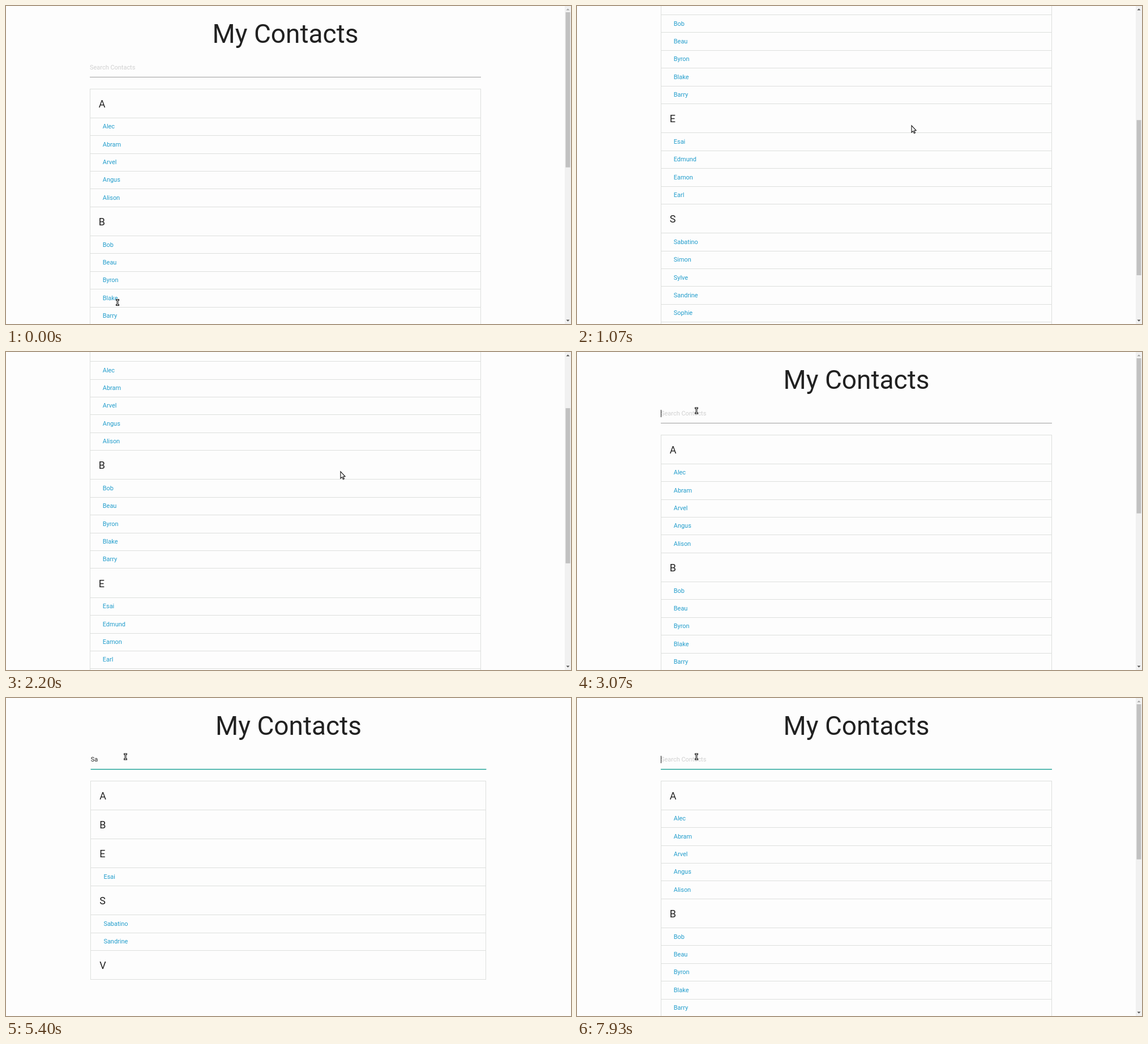
Animation of 998 by 561 pixels, one loop 8 s. Source, as an HTML page with a canvas:

```html
<!DOCTYPE html>
<html lang="en">
<head>
<meta charset="utf-8">
<title>My Contacts</title>
<style>
html, body { margin: 0; width: 100%; height: 100%; overflow: hidden; background: #fdfdfd; }
canvas { display: block; }
</style>
</head>
<body>
<canvas id="stage" width="998" height="561"></canvas>
<script>
const W = 998, H = 561, LOOP = 8000, TICK = 1000 / 15;
const BAR = 11, LIST_TOP = 146, HEAD_H = 51.3, ROW_H = 31.4, BOTTOM_GAP = 10.5;
const FONT = 'Roboto, Arial, sans-serif';
const ctx = document.getElementById('stage').getContext('2d');

const contacts = {
  A: ['Alec', 'Abram', 'Arvel', 'Angus', 'Alison'],
  B: ['Bob', 'Beau', 'Byron', 'Blake', 'Barry'],
  E: ['Esai', 'Edmund', 'Eamon', 'Earl'],
  S: ['Sabatino', 'Simon', 'Sylve', 'Sandrine', 'Sophie'],
  V: ['Valerie', 'Venso', 'Violetta']
};

// Keys are [tick, value...], 15 ticks per second.
const scrollKeys = [[0, 0], [6, 0], [11, 271.2], [12, 271.2], [16, 390], [18, 390], [21, 460],
  [24, 460], [27, 542.5], [35, 60], [39, 60], [41, 0]];
const pointerKeys = [[0, 197, 523, 'beam'], [2, 262, 470, 'arrow'], [5, 450, 330, 'arrow'],
  [7, 591, 211, 'arrow'], [43, 420, 160, 'arrow'], [44, 211, 103.5, 'beam']];
const queryKeys = [[0, ''], [54, 'S'], [60, 'Sa'], [84, 'S'], [86, ''], [95, 'V'],
  [97, 'Ve'], [101, 'Ven'], [113, 'V'], [115, '']];
const caretKeys = [[0, false], [46, true], [64, false], [72, true], [81, false], [84, true],
  [110, false], [113, true]];

const held = (keys, tick) => keys.filter(k => k[0] <= tick).pop();

function tween(keys, tick) {
  const i = keys.findIndex(k => k[0] > tick);
  if (i < 0) return keys[keys.length - 1][1];
  const [t0, a] = keys[i - 1], [t1, b] = keys[i];
  return a + (b - a) * (tick - t0) / (t1 - t0);
}

function rect(x, y, w, h, color) {
  ctx.fillStyle = color;
  ctx.fillRect(x, y, w, h);
}

function text(str, x, y, size, color, align = 'left') {
  ctx.font = size + 'px ' + FONT;
  ctx.textAlign = align;
  ctx.fillStyle = color;
  ctx.fillText(str, x, y);
}

function polygon(points, fill, stroke) {
  ctx.beginPath();
  points.forEach(([x, y]) => ctx.lineTo(x, y));
  ctx.closePath();
  ctx.fillStyle = fill;
  ctx.fill();
  if (stroke) {
    ctx.strokeStyle = stroke;
    ctx.lineWidth = 1.1;
    ctx.stroke();
  }
}

function layout(query) {
  const rows = [];
  let y = LIST_TOP;
  const add = (label, head) => {
    rows.push({ label, head, y });
    y += head ? HEAD_H : ROW_H;
  };
  for (const letter in contacts) {
    add(letter, true);
    contacts[letter]
      .filter(name => name.toLowerCase().includes(query.toLowerCase()))
      .forEach(name => add(name, false));
  }
  return { rows, end: y, height: y + BOTTOM_GAP };
}

function drawField(left, width, query, caret, focus) {
  if (query) text(query, left, 111.7, 10.96, '#222');
  else text('Search Contacts', left, 111.7, 10.96, '#d0d0d0');
  if (caret) {
    ctx.font = '10.96px ' + FONT;
    rect(Math.floor(left + ctx.measureText(query).width), 102, 1, 13, '#222');
  }
  rect(left, 125, width, 1, '#9e9e9e');
  ctx.globalAlpha = focus;
  rect(left, 125, width, 1.5, '#26a69a');
  ctx.globalAlpha = 1;
}

function drawList(left, width, list, scroll) {
  const line = '#dddfdd', x = Math.floor(left), right = Math.floor(left + width - 0.5);
  const border = y => rect(x, Math.floor(y - scroll) + scroll, right - x + 1, 1, line);
  border(LIST_TOP);
  for (const { label, head, y } of list.rows) {
    if (head) text(label, left + 15.6, y + 32.8, 17.97, '#212121');
    else text(label, left + 22.7, y + 18.9, 10.96, '#229dcc');
    border(y + (head ? HEAD_H : ROW_H));
  }
  for (const edge of [x, right]) rect(edge, LIST_TOP, 1, list.end - LIST_TOP, line);
}

function drawScrollbar(scroll, pageH) {
  const x = W - BAR, mid = x + 5.5, track = H - 2 * BAR - 0.5;
  rect(x, 0, BAR, H, '#f1f1f1');
  rect(x + 1.5, BAR + track * scroll / pageH, 8, track * H / pageH, '#c1c1c1');
  polygon([[mid - 3, 7.5], [mid, 4.5], [mid + 3, 7.5]], scroll > 0 ? '#505050' : '#a3a3a3');
  polygon([[mid - 3, 553.5], [mid, 556.5], [mid + 3, 553.5]], '#505050');
}

function drawPointer(x, y, kind) {
  if (kind === 'arrow') {
    polygon([[0, 0], [0, 12], [2.7, 9.6], [4.5, 13.6], [6.4, 12.8], [4.6, 8.9], [8, 8.6]]
      .map(([dx, dy]) => [x + dx, y + dy]), '#fff', '#111');
    return;
  }
  rect(x - 3, y - 6, 6, 3, '#222');
  rect(x - 3, y + 3, 6, 3, '#222');
  rect(x - 1.5, y - 5, 3, 10, '#222');
  rect(x - 0.5, y - 4.5, 1, 9, '#eee');
  rect(x - 2, y - 5, 4, 0.8, '#ccc');
  rect(x - 2, y + 4.2, 4, 0.8, '#ccc');
}

function draw(ms) {
  const tick = Math.floor((ms + 5) / TICK);
  const query = held(queryKeys, tick)[1];
  const list = layout(query);
  const scrolls = list.height > H;
  const pageW = scrolls ? W - BAR : W;
  const left = pageW * 0.15, width = pageW * 0.7;
  const scroll = tween(scrollKeys, tick);
  const focus = Math.min(1, Math.max(0, (tick - 46) / 4));

  rect(0, 0, W, H, '#fdfdfd');
  ctx.save();
  ctx.translate(0, -scroll);
  text('My Contacts', pageW / 2, 65, 46.03, '#212121', 'center');
  drawField(left, width, query, held(caretKeys, tick)[1], focus);
  drawList(left, width, list, scroll);
  ctx.restore();
  if (scrolls) drawScrollbar(scroll, list.height);
  drawPointer(...held(pointerKeys, tick).slice(1));
}

const start = performance.now();
function loop() {
  draw((performance.now() - start) % LOOP);
  requestAnimationFrame(loop);
}
loop();
</script>
</body>
</html>
```
